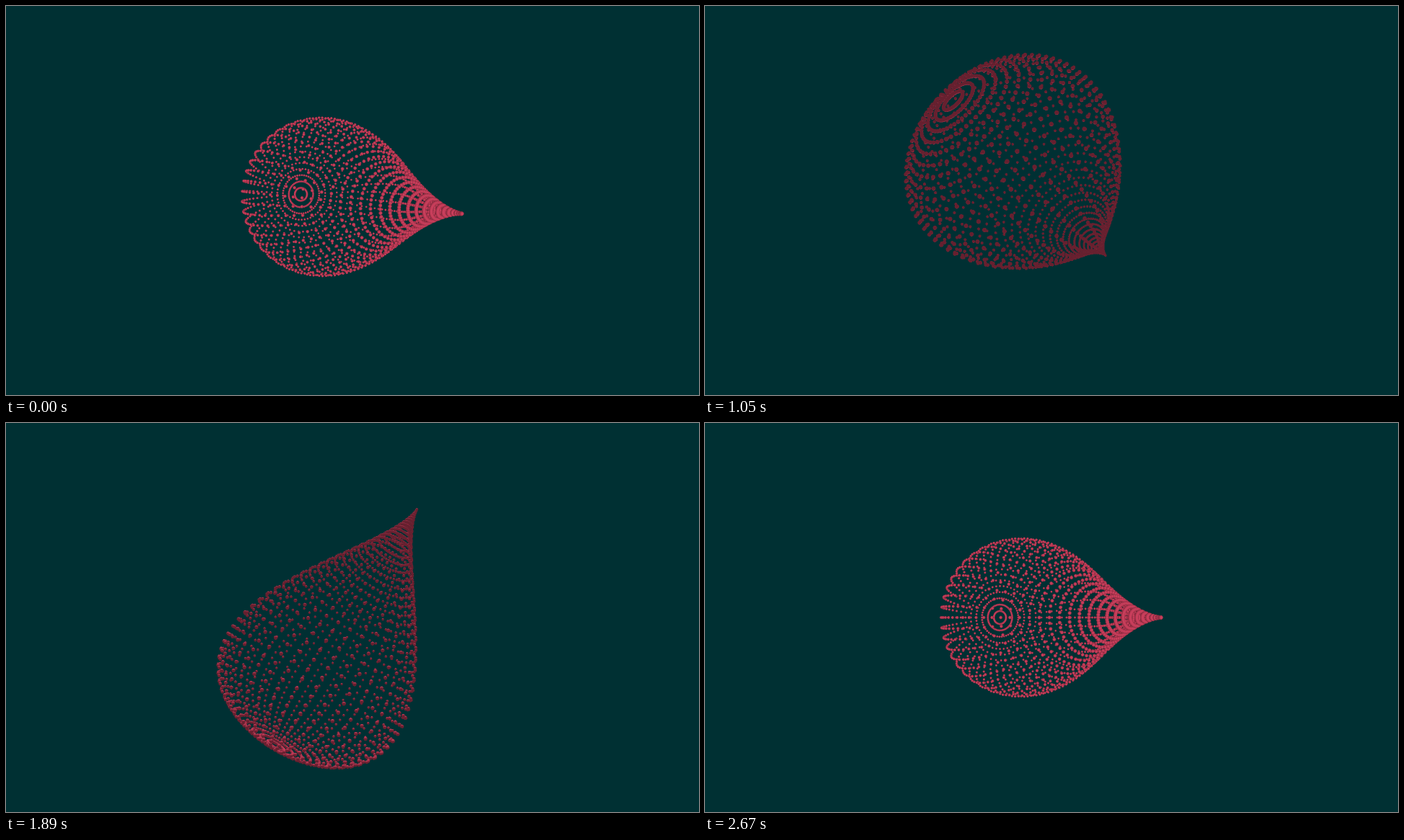
These frames come from a looping animation (960x540 px, 2700 ms). An HTML page with a canvas:

```html
<!DOCTYPE html>
<html lang="en">
<head>
<meta charset="utf-8">
<title>Turning drop</title>
<style>
html, body { margin: 0; width: 100%; height: 100%; overflow: hidden; background: #003033; }
canvas { display: block; width: 960px; height: 540px; }
</style>
</head>
<body>
<canvas id="stage" width="960" height="540"></canvas>
<script>
const STEP = 30, STEPS = 90;           // ms per step, steps per loop
const CX = 480, CY = 270;
const EYE = CY / Math.tan(Math.PI / 6); // 60 degree field of view
const SIZE = 194, BALL = 2, RINGS = 50, PER_RING = 50;
const TILT = Math.PI / 6;
const BASE = [206, 64, 94], BACK = [0, 48, 51];
const SS = 2;                           // samples per pixel side
const BOX = { x: 264, y: 50, w: 380, h: 440 };

const stage = document.getElementById('stage').getContext('2d');
const layer = document.createElement('canvas');
const W = layer.width = BOX.w * SS;
const H = layer.height = BOX.h * SS;
const ctx = layer.getContext('2d');
const image = ctx.createImageData(W, H);
const pixels = new Uint32Array(image.data.buffer);
const depth = new Float32Array(W * H);

const pack = (r, g, b) => (255 << 24 | b << 16 | g << 8 | r) >>> 0;
const back = pack(...BACK);

// Half ambient, half directional light
const shades = Array.from({ length: 256 }, (_, i) =>
  pack(...BASE.map(c => Math.round(c * (0.5 + i / 510)))));

// Teardrop of revolution: ring radius and place along the axis
const rings = Array.from({ length: RINGS }, (_, i) => {
  const u = Math.PI * i / RINGS;
  return {
    r: SIZE * 0.5 * (1 - Math.cos(u)) * Math.sin(u),
    z: SIZE * Math.cos(u)
  };
});

function drawBall(x, y, z, ly, lz) {
  const scale = EYE / (EYE - z);
  const px = (CX + x * scale - BOX.x) * SS;
  const py = (CY + y * scale - BOX.y) * SS;
  const rad = BALL * scale * SS;

  // Light along the ball's own right, down and eye directions
  const ez = EYE - z, flat = Math.hypot(y, ez), len = Math.hypot(x, flat);
  const toEye = (lz * ez - ly * y) / len;
  const down = (ly * ez + lz * y) / flat;
  const right = x * (lz * ez - ly * y) / (flat * len);

  const x1 = Math.min(W - 1, Math.floor(px + rad));
  const y1 = Math.min(H - 1, Math.floor(py + rad));
  for (let iy = Math.max(0, Math.floor(py - rad)); iy <= y1; iy++) {
    const b = (iy + 0.5 - py) / rad;
    for (let ix = Math.max(0, Math.floor(px - rad)); ix <= x1; ix++) {
      const a = (ix + 0.5 - px) / rad;
      const rest = 1 - a * a - b * b;
      if (rest < 0) continue;
      const c = Math.sqrt(rest), at = iy * W + ix, near = z + BALL * c;
      if (near <= depth[at]) continue;
      depth[at] = near;
      const lit = a * right + b * down + c * toEye;
      pixels[at] = shades[lit > 0 ? Math.min(255, lit * 255 | 0) : 0];
    }
  }
}

function render(step) {
  const angle = 2 * Math.PI * (step + 1) / STEPS;
  const s = Math.sin(angle), c = Math.cos(angle);
  const st = Math.sin(TILT), ct = Math.cos(TILT);
  const spin = -angle / 2;              // about the drop's own axis
  pixels.fill(back);
  depth.fill(-1e4);
  for (let j = 0; j < PER_RING; j++) {
    const v = spin + 2 * Math.PI * j / PER_RING;
    const cv = Math.cos(v), sv = Math.sin(v);
    for (const { r, z } of rings) {
      const x = r * cv * ct + z * st;
      const y = r * sv;
      const d = z * ct - r * cv * st;
      drawBall(x, y * c + d * s, d * c - y * s, s, c);
    }
  }
  ctx.putImageData(image, 0, 0);
  stage.fillStyle = `rgb(${BACK})`;
  stage.fillRect(0, 0, 960, 540);
  stage.drawImage(layer, BOX.x, BOX.y, BOX.w, BOX.h);
}

let shown = -1;
function tick(now) {
  const step = Math.floor(Math.max(0, now) / STEP) % STEPS;
  if (step !== shown) render(shown = step);
  requestAnimationFrame(tick);
}
render(shown = 0);
requestAnimationFrame(tick);
</script>
</body>
</html>
```
